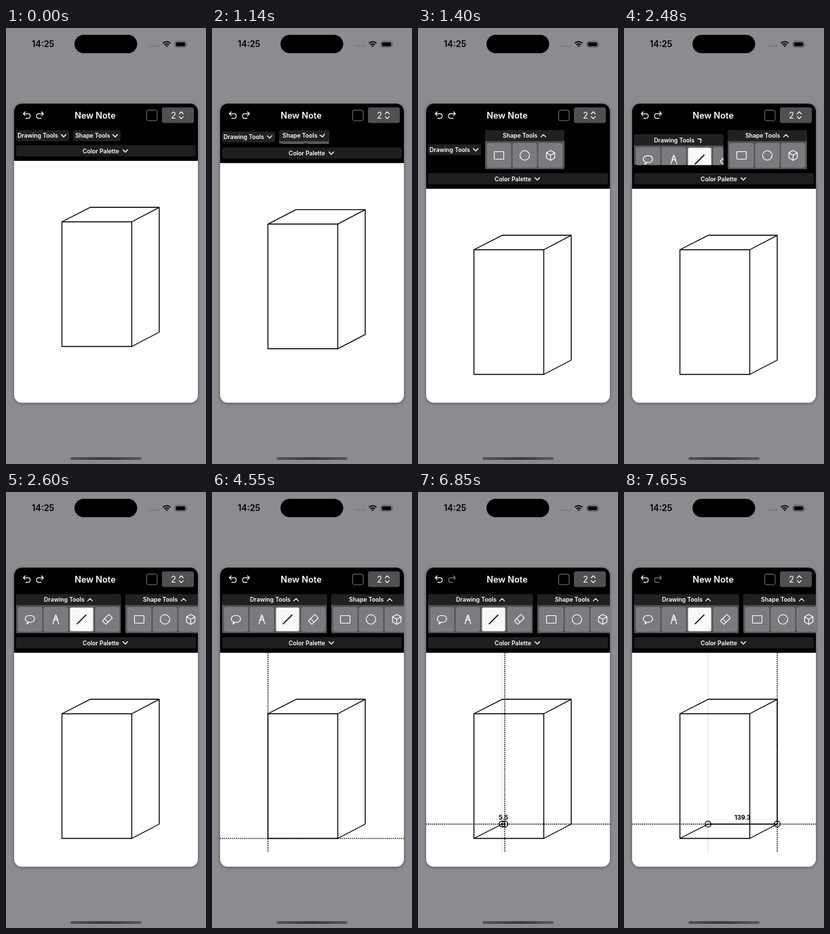
Animation of 295 by 640 pixels, one loop 8 s. Source, as an HTML page:

```html
<!DOCTYPE html>
<html lang="en">
<head>
<meta charset="utf-8">
<title>Note sketch</title>
<style>
  html, body { margin: 0; width: 100%; height: 100%; overflow: hidden; background: #8b8b90; }
  svg { display: block; }
  text { font-family: Inter, "Open Sans", sans-serif; font-weight: 600; }
  .small { font-size: 8.7px; fill: #fff; }
  .icon { fill: none; stroke: #fff; stroke-width: 1.15; stroke-linecap: round; stroke-linejoin: round; }
  .ink { fill: none; stroke: #000; stroke-width: 1.4; stroke-linecap: round; stroke-linejoin: round; }
  .dots { stroke: #000; stroke-width: 1.5; stroke-dasharray: 1.5 1.4; }
  .thin { stroke: #dcdcdc; stroke-width: 1; }
</style>
</head>
<body>
<svg id="stage" width="295" height="640" viewBox="0 0 295 640">
  <defs>
    <clipPath id="card"><rect x="12" y="111" width="271" height="439" rx="11"/></clipPath>
    <filter id="shade" x="-10%" y="-10%" width="120%" height="120%"><feGaussianBlur stdDeviation="2.5"/></filter>
    <linearGradient id="homeFill"><stop stop-color="#555558"/><stop offset=".5" stop-color="#39393c"/><stop offset="1" stop-color="#59595d"/></linearGradient>
    <path id="chevron" class="icon" d="M-3.4-1.7L0 1.8L3.4-1.7" style="stroke-width:1.35"/>
    <path id="turn" class="icon" d="M-2.2-5L-5-2.2L-2.2.6M-5-2.2H1.8A3.4 3.4 0 0 1 1.8 4.6H-1.5"/>
  </defs>

  <rect width="295" height="640" fill="#8b8b90"/>
  <text x="38" y="28.3" font-size="12.6">14:25</text>
  <rect x="101" y="10" width="92.5" height="27" rx="13.5"/>
  <g fill="#707074">
    <circle cx="212.7" cy="26.6" r="1.2"/><circle cx="216.8" cy="26.6" r="1.2"/>
    <circle cx="220.9" cy="26.6" r="1.2"/><circle cx="225" cy="26.6" r="1.2"/>
  </g>
  <g fill="none" stroke="#000" stroke-width="1.8">
    <path d="M231.4 22.4A8 8 0 0 1 242.6 22.4M233.6 24.8A5 5 0 0 1 240.4 24.8"/>
    <path d="M235.3 26.2L237 28.2L238.7 26.2Q237 24.9 235.3 26.2Z" fill="#000" stroke="none"/>
  </g>
  <rect x="249.2" y="19.5" width="16.4" height="8.6" rx="2.7" fill="none" stroke="#4c4c50" stroke-width=".9"/>
  <rect x="250.6" y="20.9" width="13.6" height="5.8" rx="1.5"/>
  <path d="M266.8 22.2Q268.4 23.8 266.8 25.4Z" fill="#4c4c50"/>

  <rect x="12" y="112" width="271" height="439" rx="11" opacity=".35" filter="url(#shade)"/>
  <g clip-path="url(#card)">
    <rect x="12" y="111" width="271" height="439" fill="#fff"/>
    <rect id="header" x="12" y="111" width="271" height="84"/>
    <use href="#turn" x="30.5" y="128"/>
    <use id="redo" href="#turn" transform="translate(50.2 128) scale(-1 1)"/>
    <text x="131.5" y="132.8" font-size="12.8" fill="#fff" text-anchor="middle">New Note</text>
    <rect x="207.5" y="120.5" width="15.5" height="15.5" rx="2.5" stroke="#77777a"/>
    <rect x="230" y="116.5" width="47" height="23" rx="3" fill="#505053"/>
    <text x="243.3" y="132.8" font-size="12.6" fill="#fff" style="font-weight:400">2</text>
    <path class="icon" d="M255.5 126L258.5 123L261.5 126M255.5 130.2L258.5 133.2L261.5 130.2"/>
    <g id="tools"></g>
    <g id="palette">
      <rect x="15" y="172" width="265" height="16.5" rx="2.5" fill="#1e1e20"/>
      <text class="small" x="113" y="183.6">Color Palette</text>
      <use href="#chevron" x="176" y="180.4"/>
    </g>
    <g id="guides"></g>
    <g id="sketch" class="ink">
      <rect x="82.5" y="284.5" width="103" height="183"/>
      <path d="M82.5 284.5L124 263.3H226L185.5 284.5M226 263.3V446.5L185.5 467.5"/>
      <path id="edge" d="M82.5 467.5L124 446.5"/>
    </g>
    <g id="live"></g>
  </g>
  <rect x="95" y="630" width="105" height="4" rx="2" fill="url(#homeFill)"/>
</svg>

<script>
const LOOP = 8000, OPEN_SHIFT = 41, UNITS_PER_PX = 1.366;
const el = id => document.getElementById(id);
const at = (steps, t) => steps.reduce((last, s) => t >= s[0] ? s : last, null);

const shapeOpen = [[0, 0], [1140, .08], [1260, .69], [1400, 1]];
const drawOpen = [[0, 0], [2480, .7], [2600, 1]];

// Each pose: time, pointer x, pointer y
const firstDrag = [
  [4550, 82.5, 508.5], [4870, 97, 502], [4990, 114, 488], [5110, 124, 476],
  [5390, 124, 480], [5500, 124, 484], [5610, 124, 487.5]
];
const secondDrag = [[6530, 124, 487.5]];
for (let i = 1; i <= 8; i++) {
  const k = i / 8;
  secondDrag.push([6740 + (i - 1) * 800 / 7, 124 + 94 * k * k * (3 - 2 * k), 487.5]);
}
secondDrag.push([7650, 226, 487.5]);

const icons = {
  lasso: '<path d="M-3.8 3.6C-9 1.2-8-5.8 0-5.8S9 2.8 1.5 4.2Q-.8 4.6-2.2 3.9Q-2.7 6.6-5.2 6.7Q-3.6 5.5-3.8 3.6Z"/>',
  pen: '<path d="M-4.2 6.5L-1.7-3.2L0-6.7L1.7-3.2L4.2 6.5M-1.7-3.2H1.7M-2.5 1.8L0-1L2.5 1.8"/>',
  line: '<path d="M-6.5 6.5L6.5-6.5" stroke="#000" style="stroke:#000;stroke-width:1.6"/>',
  eraser: '<g transform="rotate(-45)"><rect x="-6.8" y="-3.7" width="13.6" height="7.4" rx="1"/><path d="M-2.2-3.7V3.7"/></g>',
  rect: '<rect x="-7" y="-5.5" width="14" height="11" rx=".8"/>',
  circle: '<circle r="7"/>',
  cube: '<path d="M0-7.3L6.2-3.8V3.7L0 7.3L-6.2 3.7V-3.8ZM-6.2-3.8L0-.2L6.2-3.8M0-.2V7.3"/>'
};

function toolGroup(name, tools, x, y, w, h, p, textX, chevronX) {
  const buttons = tools.map((tool, i) => `
    <rect x="${3.2 + i * 38}" y="19.5" width="34.6" height="35" rx="2.5"
      fill="${tool === 'line' ? '#f8f8f8' : '#7b7b7f'}" stroke="#929296" stroke-width=".6"/>
    <g class="icon" transform="translate(${20.5 + i * 38} 37)">${icons[tool]}</g>`).join('');
  const body = p ? `<rect width="${w}" height="${h}" rx="2.5" fill="#58585b"/>${buttons}` : '';
  return `<svg x="${x}" y="${y}" width="${w}" height="${h}">${body}
    <rect width="${w}" height="16.3" rx="2.5" fill="#212123"/>
    <text class="small" x="${textX}" y="11.4">${name}</text>
    <use href="#chevron" transform="translate(${chevronX} 8.2) rotate(${-180 * p})"/></svg>`;
}

function toolRow(s, d) {
  const shapeH = 16.5 + 41 * s, drawH = 16.5 + 41 * d, rowH = Math.max(shapeH, drawH);
  const drawW = 78 + 76.5 * d;
  return toolGroup('Drawing Tools', ['lasso', 'pen', 'line', 'eraser'],
      15, 150 + (rowH - drawH) / 2, drawW, drawH, d, 2 + 39 * d, 70 + 39 * d) +
    toolGroup('Shape Tools', ['rect', 'circle', 'cube'],
      21 + drawW + .5 * d, 150 + (rowH - shapeH) / 2, 70 + 47 * s, shapeH, s, 3.2 + 22.8 * s, 62 + 24 * s);
}

const cross = (cls, x, y) =>
  `<path class="${cls}" d="M${x} 236.5V529M12 ${y}H283"/>`;

function drawDrag(steps, t) {
  const pose = at(steps, t);
  if (!pose) return ['', ''];
  const [, x0, y0] = steps[0], [, x, y] = pose;
  const moved = pose !== steps[0];
  const guides = (moved ? cross('thin', x0, y0) : '') + cross('dots', x, y);
  if (!moved) return [guides, ''];
  const length = (Math.hypot(x - x0, y - y0) * UNITS_PER_PX).toFixed(1);
  return [guides, `<g class="ink"><path d="M${x0} ${y0}L${x} ${y}"/>
    <circle cx="${x0}" cy="${y0}" r="4.4"/><circle cx="${x}" cy="${y}" r="4.4"/></g>
    <text x="${(x0 + x) / 2}" y="${(y0 + y) / 2 - 7}" font-size="9" text-anchor="middle" style="font-weight:700">${length}</text>`];
}

function render(t) {
  const s = at(shapeOpen, t)[1], d = at(drawOpen, t)[1];
  const shift = OPEN_SHIFT * s, committed = t >= 6530;
  el('header').setAttribute('height', 84 + shift);
  for (const id of ['palette', 'sketch']) el(id).setAttribute('transform', `translate(0 ${shift})`);
  el('tools').innerHTML = toolRow(s, d);
  el('redo').setAttribute('opacity', committed ? .5 : 1);
  el('edge').setAttribute('visibility', committed ? 'visible' : 'hidden');
  [el('guides').innerHTML, el('live').innerHTML] = drawDrag(committed ? secondDrag : firstDrag, t);
}

const start = performance.now();
function tick() {
  render((performance.now() - start) % LOOP);
  requestAnimationFrame(tick);
}
tick();
</script>
</body>
</html>
```
